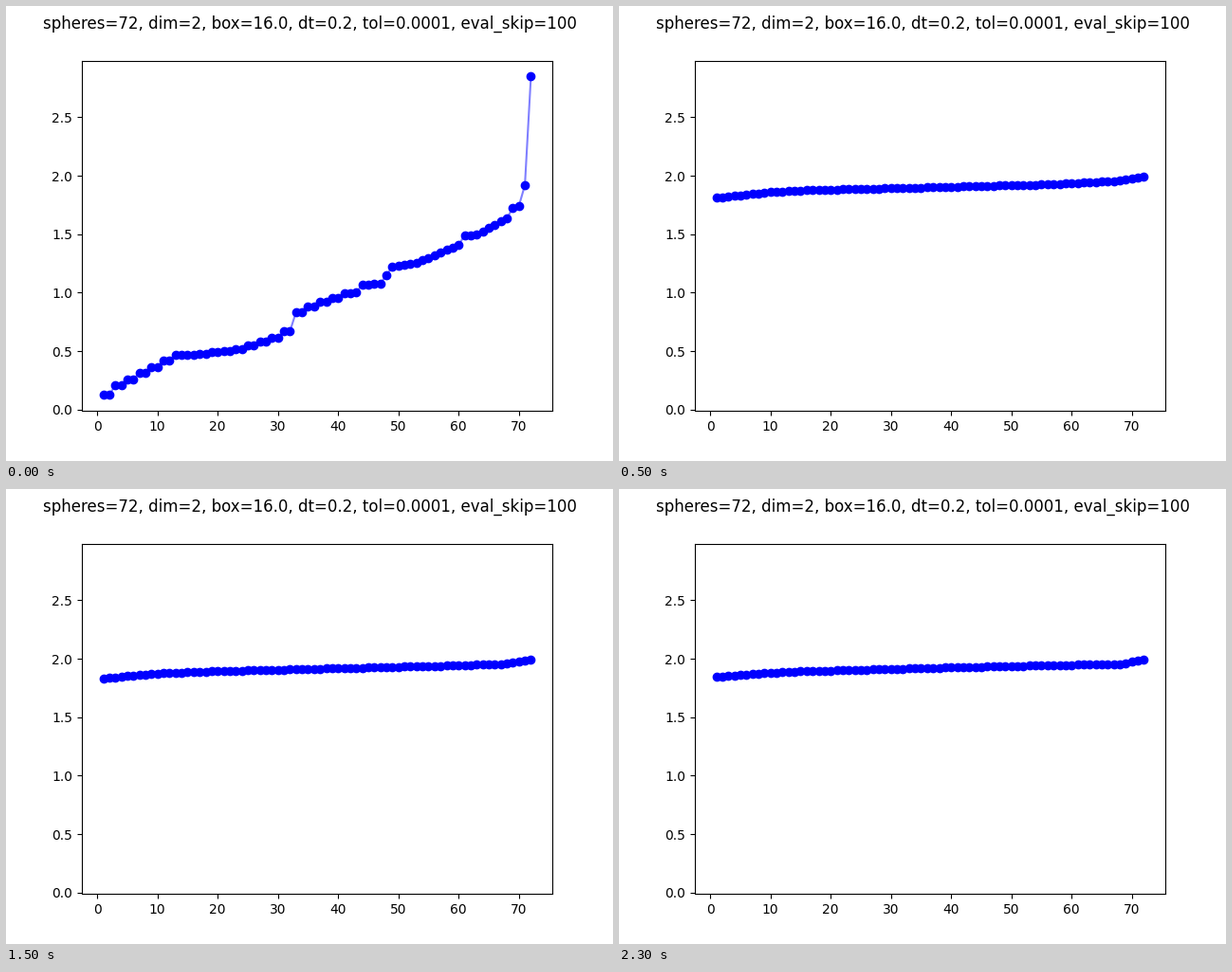
A matplotlib script that plays this animation: 640x480 px, repeating every 2.5 s.

```python
import matplotlib.pyplot as plt
import numpy as np
from matplotlib.animation import FuncAnimation

W, H, DPI = 640, 480, 100
N, STATES = 72, 5
LOW, HIGH = 0.1245, 2.849      # range of the distances before settling

index = np.arange(1, N + 1)

# Key points of the random start: sphere number -> sorted distance
START = {
    1: LOW, 3: 0.209, 13: 0.468, 17: 0.476, 23: 0.517, 29: 0.614,
    31: 0.671, 33: 0.833, 35: 0.882, 41: 0.995, 43: 1.003, 44: 1.068,
    47: 1.076, 49: 1.222, 53: 1.255, 60: 1.409, 61: 1.490, 63: 1.498,
    68: 1.636, 69: 1.725, 70: 1.741, 71: 1.920, N: HIGH,
}

# Nearly even distances, at the first and the last settled step
KNOTS = [1, 10, 16, 38, 58, 68, N]
SETTLED = np.array([1.812, 1.860, 1.877, 1.903, 1.929, 1.959, 1.994])
FINAL = np.array([1.845, 1.879, 1.894, 1.923, 1.946, 1.955, 1.992])


def distances(step):
    if step == 0:
        # Close spheres are each other's neighbour, so they share a distance
        paired = np.where(index <= 42, index - 1 + index % 2, index)
        return np.interp(paired, list(START), list(START.values()))
    t = (step - 1) / (STATES - 2)
    return np.interp(index, KNOTS, SETTLED + (FINAL - SETTLED) * t)


def padded(low, high):
    pad = 0.05 * (high - low)
    return low - pad, high + pad


fig, ax = plt.subplots(figsize=(W / DPI, H / DPI), dpi=DPI)
fig.suptitle("spheres=72, dim=2, box=16.0, dt=0.2, tol=0.0001, eval_skip=100")
ax.set_xlim(padded(1, N))
ax.set_ylim(padded(LOW, HIGH))
line, = ax.plot(index, distances(0), "b-", alpha=0.5)
dots, = ax.plot(index, distances(0), "bo")


def update(step):
    for artist in (line, dots):
        artist.set_ydata(distances(step))
    return line, dots


anim = FuncAnimation(fig, update, frames=STATES, interval=500,
                     repeat=True, repeat_delay=0)
plt.show()
```
